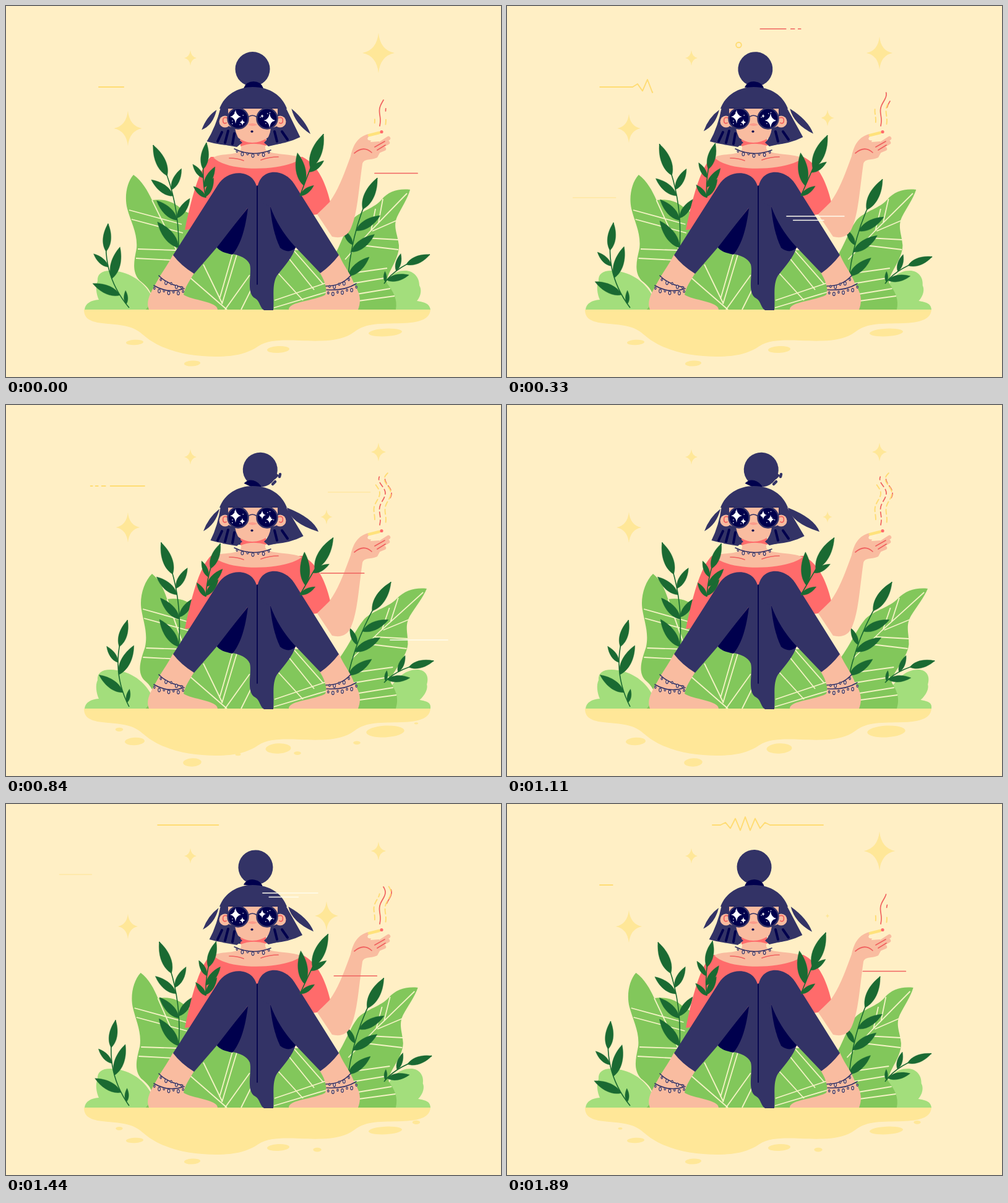
Animation of 800x600 px, one loop 1920 ms. Source, as an HTML page:

```html
<!DOCTYPE html>
<html lang="en">
<head>
<meta charset="utf-8">
<title>Calm evening</title>
<style>
  html, body { margin: 0; width: 100%; height: 100%; overflow: hidden; background: #ffefc5; }
  svg { display: block; width: 100vw; height: 100vh; }
  .sand { fill: #ffe798; }
  .bush { fill: #a3de7c; }
  .leaf { fill: #82c75b; }
  .vein { fill: none; stroke: #f4f3c4; stroke-width: 1.8; }
  .sprig { fill: #1a6a32; stroke: #1a6a32; }
  .stem { fill: none; stroke-width: 1.6; }
  .skin { fill: #f9bca0; }
  .finger { stroke: #f9bca0; stroke-width: 6.5; }
  .coral { fill: #ff6b6b; }
  .navy { fill: #333366; }
  .dark { fill: #00004d; }
  .line { fill: none; stroke-linecap: round; stroke-linejoin: round; }
  .red { stroke: #f0625f; stroke-width: 1.7; }
  .gold { stroke: #ffdc73; stroke-width: 1.9; }
  .pale { stroke: #ffe8a4; stroke-width: 1.6; }
  .white { stroke: #fffdf0; stroke-width: 1.6; }
  .ink { stroke: #333366; stroke-width: 1.6; }
  .strand { stroke: #00004d; stroke-width: 4; }
  .bead { fill: #f9d3c0; stroke: #333366; stroke-width: 1.2; }
</style>
</head>
<body>
<svg viewBox="0 0 800 600" preserveAspectRatio="none">
  <rect width="800" height="600" fill="#ffefc5"/>
  <g id="stars" class="sand"></g>
  <circle id="ring" cx="374.500" cy="63" r="4.300" class="line gold"/>

  <path class="sand" d="M126 491C126 507 138 512 165 514C212 517 214 527 232 540C262 560 300 567 340 567C372 567 392 561 408 550C424 540 446 540 474 541C520 543 544 541 563 527C582 512 606 514 640 513C672 512 685 505 686 491Z"/>
  <g id="puddles" class="sand"></g>

  <g class="bush">
    <path d="M127 491C128 481 137 476 150 475C146 466 144 453 148 445C147 434 154 428 169 428C196 429 221 442 236 470L240 491Z"/>
    <path id="bushR" d="M686 491C684 480 675 479 664 477C671 469 672 458 668 452C668 438 658 428 645 428C625 428 612 440 600 491Z"/>
  </g>

  <g id="leafL">
    <path class="leaf" d="M206 273C195 285 191 309 196 328C202 350 213 368 211 392C207 412 203 430 216 444C230 455 237 462 240 491H350V360L285 330C272 316 254 311 236 314C229 299 220 283 206 273Z"/>
    <path class="vein" d="M199 330L284 353M203 345L286 367M236 314L276 396M213 393L274 395M210 408L268 411"/>
  </g>
  <g id="leafR">
    <path class="leaf" d="M653 297C633 295 618 300 607 313C596 327 573 331 559 346C545 366 538 398 520 420L520 491H630C633 474 626 462 616 449C612 435 636 411 635 387C633 369 625 357 632 341C639 326 649 312 653 297Z"/>
    <path class="vein" d="M648 303L588 365L548 410M590 363L597 328M602 350L609 312M592 364L631 347M580 375L634 378M575 387L634 394M545 434L616 424M540 452L612 440M555 468L621 457M555 479L628 469"/>
  </g>
  <path class="leaf" d="M226 491L300 395H505L574 491Z"/>
  <path class="vein" d="M296 438L357 491M319 418L349 480M366 401L345 474M373 402L349 482M394 435L354 491M396 459L380 491M463 393L512 449M453 403L498 459M438 430L480 476M434 476L520 447M433 488L520 462"/>
  <g id="backPlants" class="sprig"></g>

  <path class="coral" d="M331 244C313 262 300 308 289 362L400 350L503 337L524 317C515 280 501 255 479 244Z"/>
  <path class="skin" d="M335 245C348 237 379 243 380 230V214H419V230C420 242 460 237 478 246C452 267 360 270 335 245Z"/>
  <path class="line red" d="M361 246Q374 246 384 250M412 249Q426 244 440 244"/>

  <path class="skin" d="M523 317C538 296 547 270 557 243C561 224 569 211 586 207L592 212L589 220L603 219L606 234L600 245C590 250 579 246 576 255C570 297 568 335 558 358C552 374 539 376 527 373L503 337Z"/>
  <path class="line finger" d="M592 231L618 214M594 234L617 221M594 238L611 231"/>
  <path class="line red" d="M563 238Q578 225 591 237M596 228L612 219M600 233L613 225"/>
  <ellipse cx="591" cy="213" rx="7" ry="4" fill="#fff0c9" transform="rotate(-20 591 213)"/>
  <path class="line" stroke="#ffe27b" stroke-width="4.500" d="M587 209L603 205"/>
  <circle class="coral" cx="607" cy="203.500" r="2.600"/>

  <path class="skin" d="M270 402L304 432C297 444 289 455 287 467C300 476 342 478 342 491H231C225 477 235 462 242 449C251 432 262 418 270 402Z"/>
  <path class="skin" d="M538 402C547 423 558 434 563 451C573 465 574 478 569 491H457C457 478 499 477 516 467C520 455 514 443 507 431Z"/>

  <path class="navy" d="M390 327L340 389C347 403 385 397 394 418C398 433 387 465 403 473C411 478 410 488 417 492H432C434 471 429 451 438 436C450 421 464 405 468 390L427 324L406 290Z"/>
  <path class="dark" d="M391 327C387 359 380 385 366 402C353 399 345 397 340 389Z"/>
  <path class="dark" d="M427 324C429 350 434 372 443 391C453 399 462 398 470 389Z"/>
  <path class="navy" d="M406 298C404 264 359 261 342 290L270 403Q283 420 304 433L342 389L390 327L406 312Z"/>
  <path class="navy" d="M406 298C408 261 449 261 466 288L538 403Q524 421 508 432L467 389Q440 360 427 324L406 316Z"/>
  <path class="line" stroke="#00004d" stroke-width="1.700" d="M406 291V450"/>
  <g id="frontPlants" class="sprig"></g>

  <g id="backHair">
    <path class="navy" d="M347 164Q339 195 324 219Q347 226 374 226L385 200H415L424 225Q453 223 475 212L452 164Z"/>
  </g>
  <path class="navy" id="tressL"/>
  <path class="navy" id="tressR"/>
  <path class="coral" d="M379 213H420L421 226Q399 219 379 227Z"/>
  <path class="skin" d="M359 160V188C363 209 382 221 398 221C416 221 435 209 439 188V160Z"/>
  <path class="navy" d="M356 193L370 198Q373 214 382 221L373 228L350 224ZM442 193L428 198Q426 213 417 221L424 227L446 222Z"/>
  <path class="line strand" d="M349 204L342 219M359 202L354 221M369 206L366 223M434 203L438 219M446 203L455 216"/>
  <circle class="skin" cx="354" cy="187" r="9.500"/><circle class="skin" cx="443" cy="187" r="9.500"/>
  <path class="line red" d="M358 181Q349 178 351 188Q353 191 356 189M440 181Q449 178 447 188Q445 191 442 189"/>
  <path class="coral" d="M391 192Q398 187 406 192Q399 196 391 192Z" opacity=".4"/>
  <ellipse class="dark" cx="397.500" cy="203" rx="2.200" ry="1.700"/>

  <g id="bun">
    <circle class="navy" cx="398.500" cy="102" r="28"/>
    <path class="dark" d="M384 133Q388 122 400 122Q412 122 416 133Z"/>
  </g>
  <path class="navy" d="M345 166C353 144 374 131 399 131C427 131 446 145 454 166Z"/>
  <path class="line" stroke="#232358" d="M360 165H439"/>
  <path id="flyaway" class="line" stroke="#333366" stroke-width="4.500" d="M431 128L435 124M434 118L438 114M442 116L443 112"/>

  <g fill="#00004d" stroke="#333366" stroke-width="2.500"><circle cx="375" cy="182" r="16.500"/><circle cx="422" cy="182" r="16.500"/></g>
  <path class="line ink" d="M391 180Q398 174 406 180"/>
  <g id="lens" fill="#fff"></g>

  <path class="line ink" d="M369 231Q398 245 428 233"/>
  <path class="line ink" d="M247 436Q260 450 286 455M239 452Q262 466 288 457M517 453Q542 453 557 436M518 459Q547 461 566 449"/>
  <g id="beads"></g>
  <g id="smoke"></g>
  <g id="streaks"></g>
</svg>
<script>
const LOOP = 1920, TURN = 1005;
const $ = id => document.getElementById(id);
const set = (el, k, v) => el.setAttribute(k, v);
const clamp = (x, lo = 0, hi = 1) => Math.min(hi, Math.max(lo, x));

function add(parent, tag, attrs) {
  const el = document.createElementNS('http://www.w3.org/2000/svg', tag);
  for (const k in attrs) set(el, k, attrs[k]);
  return $(parent).appendChild(el);
}

// Linear value between keyed positions
function track(t, at, vals) {
  const i = at.findIndex(a => t < a);
  if (i < 0) return vals[vals.length - 1];
  if (!i) return vals[0];
  return vals[i - 1] + (vals[i] - vals[i - 1]) * (t - at[i - 1]) / (at[i] - at[i - 1]);
}

let seed = 7;
const random = () => (seed = seed * 16807 % 2147483647) / 2147483647;

// Leaf outline from its base, heading and length
function leafPath(x, y, angle, len) {
  const at = (u, v) => [
    x + len * (u * Math.cos(angle) - v * Math.sin(angle)),
    y + len * (u * Math.sin(angle) + v * Math.cos(angle))
  ].join(' ');
  return `M${x} ${y}C${at(.25, .2)} ${at(.65, .18)} ${at(1, 0)}C${at(.65, -.18)} ${at(.25, -.2)} ${x} ${y}Z`;
}

// A sprig bends from base to tip; leaves are [place on stem, length], negative to the left
function sprig({ layer, base, bend, tip, crown, spread, turn, power, leaves }) {
  const point = u => base.map((b, k) => (1 - u) ** 2 * b + 2 * u * (1 - u) * bend[k] + u * u * tip[k]);
  const heading = u => {
    const [dx, dy] = base.map((b, k) => (1 - u) * (bend[k] - b) + u * (tip[k] - bend[k]));
    return Math.atan2(dy, dx);
  };
  const [cx, cy] = point(crown);
  let d = leafPath(cx, cy, Math.atan2(tip[1] - cy, tip[0] - cx), Math.hypot(tip[0] - cx, tip[1] - cy));
  for (const [u, len] of leaves)
    d += leafPath(...point(u), heading(u) + Math.sign(len) * spread * Math.PI / 180, Math.abs(len));
  const el = add(layer, 'g', {});
  el.innerHTML = `<path class="stem" d="M${base}Q${bend} ${tip}"/><path stroke-width=".4" d="${d}"/>`;
  return sway => set(el, 'transform', `rotate(${turn * sway ** power} ${base})`);
}
const sprigs = [
  { layer: 'backPlants', base: [279, 391], bend: [278, 300], tip: [234, 226], crown: .68, spread: 40, turn: 5.7, power: .2,
    leaves: [[0, -54], [.27, 38], [.25, -46], [.54, 38], [.48, -44]] },
  { layer: 'backPlants', base: [199, 488], bend: [150, 430], tip: [165, 352], crown: .7, spread: 35, turn: 13, power: 1,
    leaves: [[.05, 22], [.17, -48], [.38, 53], [.52, -32]] },
  { layer: 'backPlants', base: [553, 437], bend: [560, 350], tip: [600, 278], crown: .66, spread: 43, turn: 8.2, power: .8,
    leaves: [[0, 46], [.23, 47], [.3, -29], [.44, 46]] },
  { layer: 'backPlants', base: [611, 449], bend: [630, 420], tip: [685, 402], crown: .6, spread: 38, turn: 8.7, power: .8,
    leaves: [[.05, -17], [.1, 37], [.38, -29]] },
  { layer: 'frontPlants', base: [323, 310], bend: [313, 270], tip: [322, 221], crown: .54, spread: 35, turn: 15.9, power: .35,
    leaves: [[0, -27], [.02, 33], [.2, 38], [.38, -28]] },
  { layer: 'frontPlants', base: [475, 307], bend: [490, 268], tip: [513, 207], crown: .5, spread: 32, turn: 9.4, power: .8,
    leaves: [[0, 28], [.2, -54], [.44, 30]] }
].map(sprig);

// Stars pulse with the sway clock u
const STAR = 'M0-1Q.11-.14 1 0Q.11.14 0 1Q-.11.14-1 0Q-.11-.14 0-1Z';
const rightLens = u => 9.5 - 3.5 * clamp((u - 330) / 240);
const stars = [
  ['stars', 602, 76, u => 26 - 14 * clamp(u / 570) ** 2],
  ['stars', 197, 198, u => 16 + .012 * Math.abs(u - 560)],
  ['stars', 298, 84, () => 10],
  ['stars', 518, 181, u => Math.max(0, 19 - .035 * Math.abs(u - 570))],
  ['lens', 371, 179, () => 9],
  ['lens', 382, 188, () => 4.5],
  ['lens', 426, 185, rightLens],
  ['lens', 414, 178, u => 12 - rightLens(u)]
].map(([layer, x, y, size]) => {
  const el = add(layer, 'path', { d: STAR });
  return u => set(el, 'transform', `translate(${x} ${y}) scale(${size(u)} ${size(u) * 1.25})`);
});
for (let i = 0; i < 12; i++) {
  const a = i * 2.4, r = 6 + 7 * random();
  add('lens', 'circle', { cx: (i % 2 ? 375 : 422) + r * Math.cos(a), cy: 182 + r * Math.sin(a), r: .8 });
}

// Jewellery hangs beads along a sagging line
function beads(x0, y0, x1, y1, sag, n) {
  for (let i = 0; i < n; i++) {
    const u = (i + .5) / n, big = i % 2;
    add('beads', 'ellipse', {
      class: 'bead', cx: x0 + (x1 - x0) * u, cy: y0 + (y1 - y0) * u + sag * 4 * u * (1 - u) + big * 2,
      rx: 1.2 + big * .6, ry: 1.8 + big
    });
  }
}
beads(369, 233, 429, 235, 6, 7);
beads(236, 455, 290, 461, 4, 7);
beads(246, 441, 288, 457, 0, 5);
beads(517, 464, 570, 453, 3, 7);
beads(519, 454, 558, 440, 3, 5);

// Puddles swell; short-lived drops lie on an arc below the sand
const puddles = [[208, 544, 14, 4.2], [301, 578, 13, 4.5], [440, 555.5, 18, 5.5], [613, 528, 27, 6.3]]
  .map(([cx, cy, rx, ry]) => {
    const el = add('puddles', 'ellipse', { cx, cy, transform: `rotate(-3 ${cx} ${cy})` });
    return swell => { set(el, 'rx', rx * (1 + .14 * swell)); set(el, 'ry', ry * (1 + .5 * swell)); };
  });
const drops = [];
function splash(at, n) {
  for (let i = 0; i < n; i++) {
    const cx = 183 + 480 * i / (n - 1), r = 3 + 4 * random();
    const el = add('puddles', 'ellipse', { cx, cy: 566 - .0008 * (cx - 410) ** 2 });
    drops.push(t => {
      const k = clamp(1 - Math.abs(t - at) / 130);
      set(el, 'rx', r * k);
      set(el, 'ry', r * k * .5);
    });
  }
}
splash(840, 6);
splash(1440, 4);
splash(1890, 4);

// Smoke: waving strands [class, side offset, start and end as parts of the height]
const smoke = [['red', 0, 0, .9], ['red', 10, .5, .85], ['gold', -9, .1, .75], ['gold', 9, .05, 1]]
  .map(([cls, side, from, to]) => {
    const el = add('smoke', 'path', { class: 'line ' + cls });
    return sway => {
      const rise = 48 + 40 * sway ** .8;
      const reach = side ? clamp(sway * 2.5, .25, 1) : 1;
      const pts = [];
      for (let h = rise * from; h <= rise * (from + (to - from) * reach); h += 2)
        pts.push([604 + side + h * .08 + h * .1 * Math.cos((h - 49) / 8), 194 - h]);
      const solid = cls === 'red' && sway < .5;
      set(el, 'd', 'M' + pts.join('L'));
      set(el, 'stroke-dasharray', solid ? 'none' : '8 5');
    };
  });

// A streak crosses its span at a given time, growing in and shrinking out
const streaks = [];
function streak(cls, y, a, b, at, dir = 1, dashed = false) {
  const el = add('streaks', 'path', { class: 'line ' + cls });
  const len = b - a, edge = x => clamp(x, Math.max(86, a - len * .2), Math.min(714, b + len * .2));
  streaks.push(t => {
    const dt = (t - at + LOOP * 1.5) % LOOP - LOOP / 2;
    const shift = dir * dt * len / 100;
    const ends = [edge(a + shift), edge(b + shift)];
    const shown = ends[1] - ends[0];
    if (dir > 0) ends.reverse();
    set(el, 'd', shown < 1 ? '' : `M${ends[0]} ${y}H${ends[1]}`);
    if (dashed) set(el, 'stroke-dasharray', `${shown * .6} 8 6 6 4 5 3 200`);
  });
}
function twin(y, a, b, at) {
  streak('white', y, a, b, at);
  streak('white', y + 6.5, a + (b - a) * .12, a + (b - a) * .65, at);
}
streak('red', 270.5, 585, 654, 1905);
streak('red', 37, 410, 479, 330, -1, true);
streak('red', 278, 531, 600, 570);
streak('red', 272, 508, 578, 840);
streak('red', 278, 638, 706, 1320, -1);
streak('red', 278, 531, 600, 1440, -1);
streak('pale', 310, 106, 175, 330);
streak('pale', 141, 520, 588, 840);
streak('pale', 114, 86, 138, 1440);
streak('gold', 131, 131, 223, 840, 1, true);
streak('gold', 131, 648, 714, 1320, 1, true);
streak('white', 380, 620, 714, 840);
streak('white', 380, 237, 413, 1320);
streak('white', 144, 305, 394, 1320);
twin(340, 451, 544, 330);
twin(144, 320, 412, 570);
twin(144, 414, 503, 1440);

// A pulse is a travelling line that zigzags over one stretch
function pulse(y, zigX, teeth, times, tails, heads) {
  const el = add('streaks', 'path', { class: 'line gold' });
  const zig = Array.from({ length: teeth + 1 }, (_, i) => {
    const swing = Math.sin(Math.PI * i / teeth) * (i % 2 ? -13 : 9);
    return [zigX + i * 8, swing];
  });
  const height = x => y + track(x, zig.map(p => p[0]), zig.map(p => p[1]));
  streaks.push(t => {
    if (times[0] < 0 && t > LOOP + times[0]) t -= LOOP;
    const a = track(t, times, tails), b = track(t, times, heads);
    const xs = [a, ...zig.map(p => p[0]).filter(x => x > a && x < b), b];
    set(el, 'd', b - a < 1 ? '' : 'M' + xs.map(x => [x, height(x)]).join('L'));
  });
}
pulse(131, 203, 8, [-60, 0, 330, 570, 700], [150, 150, 150, 205, 306], [150, 190, 235, 306, 306]);
pulse(34, 345, 10, [1270, 1440, 1890], [245, 245, 332], [245, 343, 511]);

function skew(id, base, height, dx) {
  const k = -dx / height;
  set($(id), 'transform', `matrix(1 0 ${k} 1 ${-k * base} 0)`);
}
function tress(id, x, y, tx, ty) {
  const out = Math.sign(tx - x);
  set($(id), 'd', `M${x} ${y}Q${x + 6 * out} ${y + 25} ${tx} ${ty}Q${tx - 8 * out} ${ty - 22} ${x} ${y}Z`);
}

function draw(t) {
  const u = t <= TURN ? t : 2 * TURN - t;
  const sway = track(u, [0, 570, 840], [0, .39, 1]);
  const early = sway ** .8, mid = sway ** .35;

  skew('leafL', 491, 218, 30 * sway);
  skew('leafR', 491, 194, 27 * early);
  skew('bushR', 491, 45, 14 * early);
  skew('backHair', 165, -50, 6 * mid);
  set($('bun'), 'transform', `rotate(${25 * sway} 398.5 131)`);
  tress('tressL', 340 + 5 * mid, 168, 316 + 3 * mid, 200 + 4 * mid);
  tress('tressR', 462 - 8 * mid, 166, 492 + 13 * sway, 207 - 2 * sway);
  set($('flyaway'), 'opacity', u > 650 ? 1 : 0);
  set($('ring'), 'opacity', t > 240 && t < 420 ? 1 : 0);

  for (const place of [...sprigs, ...smoke]) place(sway);
  for (const place of stars) place(u);
  for (const place of puddles) place(clamp((u - 690) / 150));
  for (const place of [...drops, ...streaks]) place(t);
}

const start = performance.now();
function tick() {
  draw((performance.now() - start) % LOOP);
  requestAnimationFrame(tick);
}
tick();
</script>
</body>
</html>
```
